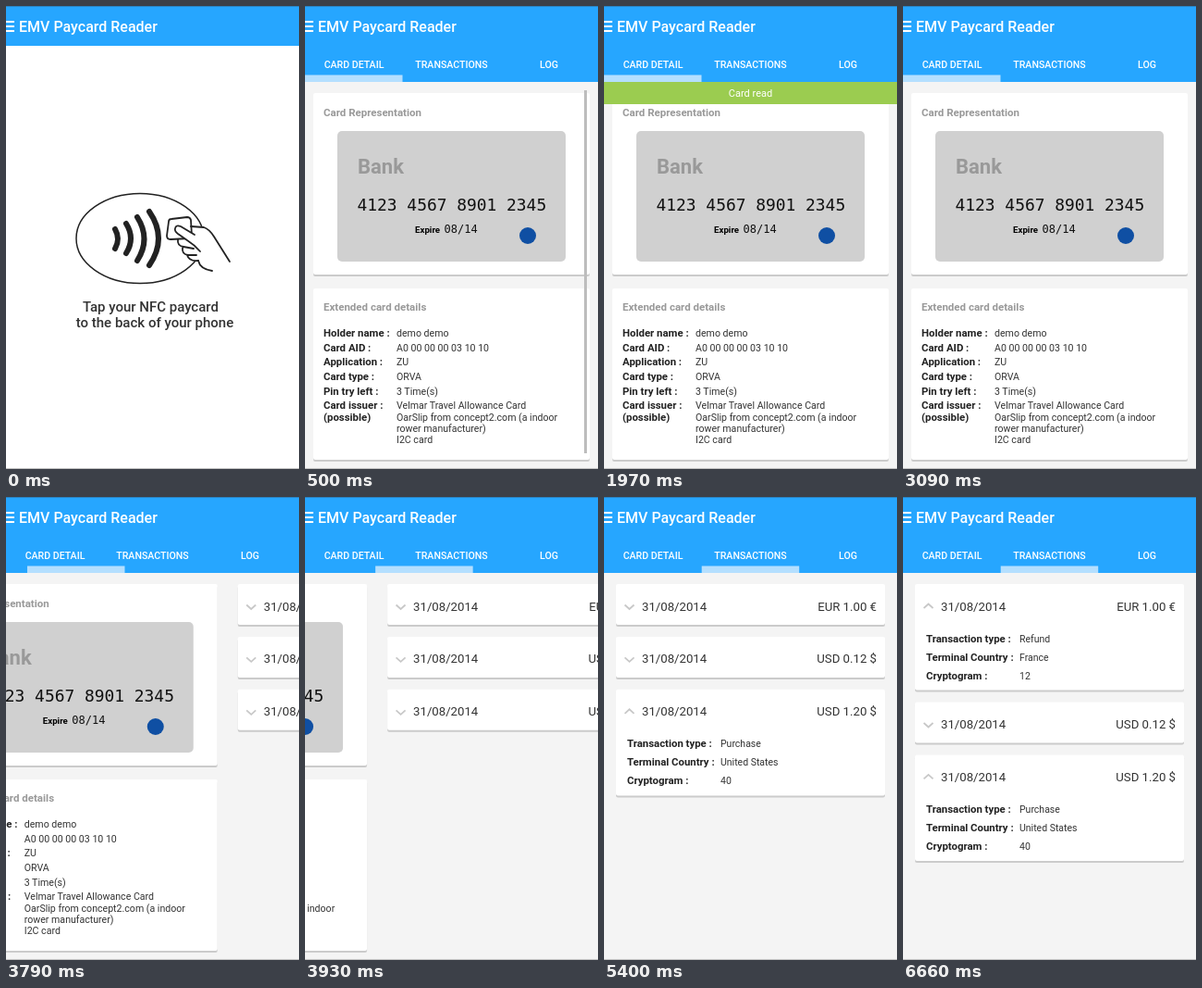
An HTML page that plays this animation: 317x500 px, repeating every 8000 ms.

```html
<!DOCTYPE html>
<html lang="en">
<head>
<meta charset="utf-8">
<title>Paycard reader</title>
<style>
  html, body { margin: 0; width: 100%; height: 100%; overflow: hidden; background: #fff; }
  svg { display: block; width: 100%; height: 100%; font-family: Roboto, sans-serif; }
  .title { font-size: 16px; font-weight: 500; fill: #fff; }
  .tab { font-size: 10.6px; font-weight: 500; fill: #fff; text-anchor: middle; }
  .notice { font-size: 11px; fill: #fff; text-anchor: middle; }
  .prompt { font-size: 15px; font-weight: 500; fill: #333; text-anchor: middle; }
  .heading { font-size: 11.5px; font-weight: 700; fill: #999; }
  .label { font-size: 11.4px; font-weight: 700; fill: #222; }
  .value { font-size: 10.6px; fill: #333; }
  .small { font-size: 10.5px; }
  .amount { font-size: 13.2px; fill: #333; }
  .end { text-anchor: end; }
  .bank { font-size: 22px; font-weight: 700; fill: #999; }
  .digits { font-family: "DejaVu Sans Mono", monospace; font-size: 17.9px; fill: #111; }
  .expiry { font-size: 12px; }
  .ink { fill: none; stroke: #222; stroke-linecap: round; stroke-linejoin: round; }
</style>
</head>
<body>
<svg id="stage" viewBox="0 0 317 500" preserveAspectRatio="none"></svg>
<script>
const LOOP = 8000, STEP = 70, WIDTH = 317, BLUE = '#26a6ff';
const EXPANSION = 70.6;

const text = (x, y, style, content) => `<text x="${x}" y="${y}" class="${style}">${content}</text>`;
const rect = (x, y, w, h, fill, extra = '') =>
  `<rect x="${x}" y="${y}" width="${w}" height="${h}" fill="${fill}" ${extra}/>`;
const ink = (d, width, fill = 'none') =>
  `<path class="ink" d="${d}" stroke-width="${width}" style="fill:${fill}"/>`;
const group = (id, content) => `<g id="${id}">${content}</g>`;
const panel = (x, y, w, h, id = '') =>
  rect(x, y + 2, w, h, '#cbcbcb', `rx="2" id="${id}Shadow"`) +
  rect(x, y, w, h, '#fff', `rx="2" id="${id}Face"`);

function homePage() {
  const waves = [[118, 241, 21, 6], [130, 235, 32, 10], [142, 228, 47, 15], [155, 222, 58, 20]]
    .map(([x, y, h, bulge]) => ink(`M${x} ${y}q${bulge} ${h / 2} 0 ${h}`, 6)).join('');
  const hand = 'M200 238L214 239Q220 241 225 249L242 276L223 286Q210 283 208 275' +
    'Q197 276 196 269Q189 268 191 261Q184 259 186 252L184 240Z';
  return rect(0, 0, WIDTH, 500, '#fff') +
    '<ellipse class="ink" cx="145" cy="251" rx="69" ry="48.5" stroke-width="1.5"/>' + waves +
    `<path d="${hand}" fill="#fff"/>` +
    ink('M179 230L196 228Q199 228 200 231L201 248Q201 251 198 251L178 252Q174 252 174 248L176 233Q176 230 179 230Z', 1.8, '#fff') +
    ink('M200 238L214 239Q220 241 225 249L242 276M223 286Q210 284 208 275', 1.8) +
    ink('M186 252Q185 259 192 260L203 262M191 261Q190 268 197 269L206 269M196 269Q198 276 208 275', 1.8) +
    ink('M204 247L189 238Q184 236 183 240Q182 243 186 246L196 253Q204 258 210 265', 1.8, '#fff') +
    text(156.5, 330, 'prompt', 'Tap your NFC paycard') +
    text(161, 347, 'prompt', 'to the back of your phone');
}

function detailPage() {
  const rows = [
    [357, 'Holder name :', 'demo demo'],
    [373, 'Card AID :', 'A0 00 00 00 03 10 10'],
    [388, 'Application :', 'ZU'],
    [404, 'Card type :', 'ORVA'],
    [420, 'Pin try left :', '3 Time(s)'],
    [435, 'Card issuer :', 'Velmar Travel Allowance Card'],
    [448, '(possible)', 'OarSlip from concept2.com (a indoor'],
    [460, '', 'rower manufacturer)'],
    [472, '', 'I2C card'],
  ];
  return panel(9, 94, 299, 196) + panel(9, 305, 299, 185) +
    text(20, 118.5, 'heading', 'Card Representation') +
    rect(35, 135, 247, 141, '#d0d0d0', 'rx="5"') +
    text(57, 181, 'bank', 'Bank') +
    text(56.5, 220.5, 'digits', '4123 4567 8901 2345') +
    `<text x="119" y="244.5" style="font-size:9.7px;font-weight:700">Expire</text>` +
    text(150.5, 245, 'digits expiry', '08/14') +
    '<circle cx="241" cy="248" r="9" fill="#0f4fa3"/>' +
    text(20, 328.5, 'heading', 'Extended card details') +
    rows.map(([y, label, value]) => text(20, y, 'label', label) + text(99, y, 'value', value)).join('') +
    rect(302, 91, 3, 392, '#bdbdbd', 'id="scrollbar"');
}

const transactions = [
  { amount: 'EUR 1.00 €', opensAt: 6590, details: ['Refund', 'France', '12'] },
  { amount: 'USD 0.12 $', opensAt: Infinity, details: [] },
  { amount: 'USD 1.20 $', opensAt: 5330, details: ['Purchase', 'United States', '40'] },
];
const detailLabels = ['Transaction type :', 'Terminal Country :', 'Cryptogram :'];

// Each row is drawn with its panel top at y = 0.
const transactionRow = ({ amount, details }, i) => group('row' + i,
  panel(13, 0, 291, 44, 'row' + i) +
  `<path id="chevron${i}" d="M22.5 22.5l5 4.5l5 -4.5" fill="none" stroke="#c8c8c8" stroke-width="1.8"/>` +
  text(41, 28.5, 'amount', '31/08/2014') +
  text(295, 28.5, 'amount end', amount) +
  group('details' + i, details.map((value, k) =>
    text(25, 62.5 + 20 * k, 'label', detailLabels[k]) +
    text(126, 62.5 + 20 * k, 'value small', value)).join('')));

const stage = document.getElementById('stage');
stage.innerHTML =
  rect(0, 0, WIDTH, 500, '#f4f4f4') +
  group('detail', detailPage()) +
  group('list', transactions.map(transactionRow).join('')) +
  group('notice', rect(0, 82, WIDTH, 24, '#9bcc50') + text(158.5, 98, 'notice', 'Card read')) +
  group('home', homePage()) +
  group('tabs', rect(0, 42, WIDTH, 40, BLUE) +
    text(53, 66.5, 'tab', 'CARD DETAIL') + text(158.5, 66.5, 'tab', 'TRANSACTIONS') +
    text(264, 66.5, 'tab', 'LOG') +
    rect(0, 74.5, 105.5, 7.5, '#b4dfff', 'id="indicator"')) +
  rect(0, 0, WIDTH, 43, BLUE) + rect(0, 0, WIDTH, 1, '#2a86c8') +
  [16, 21, 26].map(y => rect(0, y, 9, 2, '#fff')).join('') +
  text(14, 28, 'title', 'EMV Paycard Reader') +
  rect(0, 499, WIDTH, 1, '#c4c4c4');

const $ = id => document.getElementById(id);
const clamp = v => Math.max(0, Math.min(1, v));
const show = (id, visible) => $(id).setAttribute('display', visible ? 'inline' : 'none');
const move = (id, x, y) => $(id).setAttribute('transform', `translate(${x} ${y})`);

const swipeKeys = [[3650, 0], [3720, .06], [3790, .25], [3860, .53], [3930, .76],
  [4000, .89], [4100, .96], [4210, .99], [4350, 1]];
function swipe(t) {
  const next = swipeKeys.findIndex(([time]) => time > t);
  if (next < 0) return 1;
  if (next === 0) return 0;
  const [t0, v0] = swipeKeys[next - 1], [t1, v1] = swipeKeys[next];
  return v0 + (v1 - v0) * (t - t0) / (t1 - t0);
}

function draw(time) {
  const t = 10 + Math.floor((time - 10) / STEP + 1e-6) * STEP;
  const reading = t >= 500;
  show('home', !reading);
  show('tabs', reading);

  const slide = (1 - Math.cos(Math.PI * clamp((t - 500) / 490))) / 2;
  show('notice', reading && t < 3090);
  move('notice', 0, -24 * (1 - slide));
  $('scrollbar').setAttribute('opacity', clamp((1970 - t) / 280));

  const page = swipe(t);
  move('detail', -WIDTH * page, 0);
  move('list', WIDTH * (1 - page), 0);
  $('indicator').setAttribute('x', 105.7 * swipe(t - 12));

  let y = 94;
  transactions.forEach(({ opensAt }, i) => {
    const open = t >= opensAt, height = 44 + (open ? EXPANSION : 0);
    move('row' + i, 0, y);
    $(`row${i}Face`).setAttribute('height', height);
    $(`row${i}Shadow`).setAttribute('height', height);
    $('chevron' + i).setAttribute('transform', open ? 'rotate(180 27.5 24.25)' : '');
    show('details' + i, open);
    y += height + 12.9;
  });
}

const start = performance.now();
function tick() {
  draw((performance.now() - start) % LOOP);
  requestAnimationFrame(tick);
}
tick();
</script>
</body>
</html>
```
